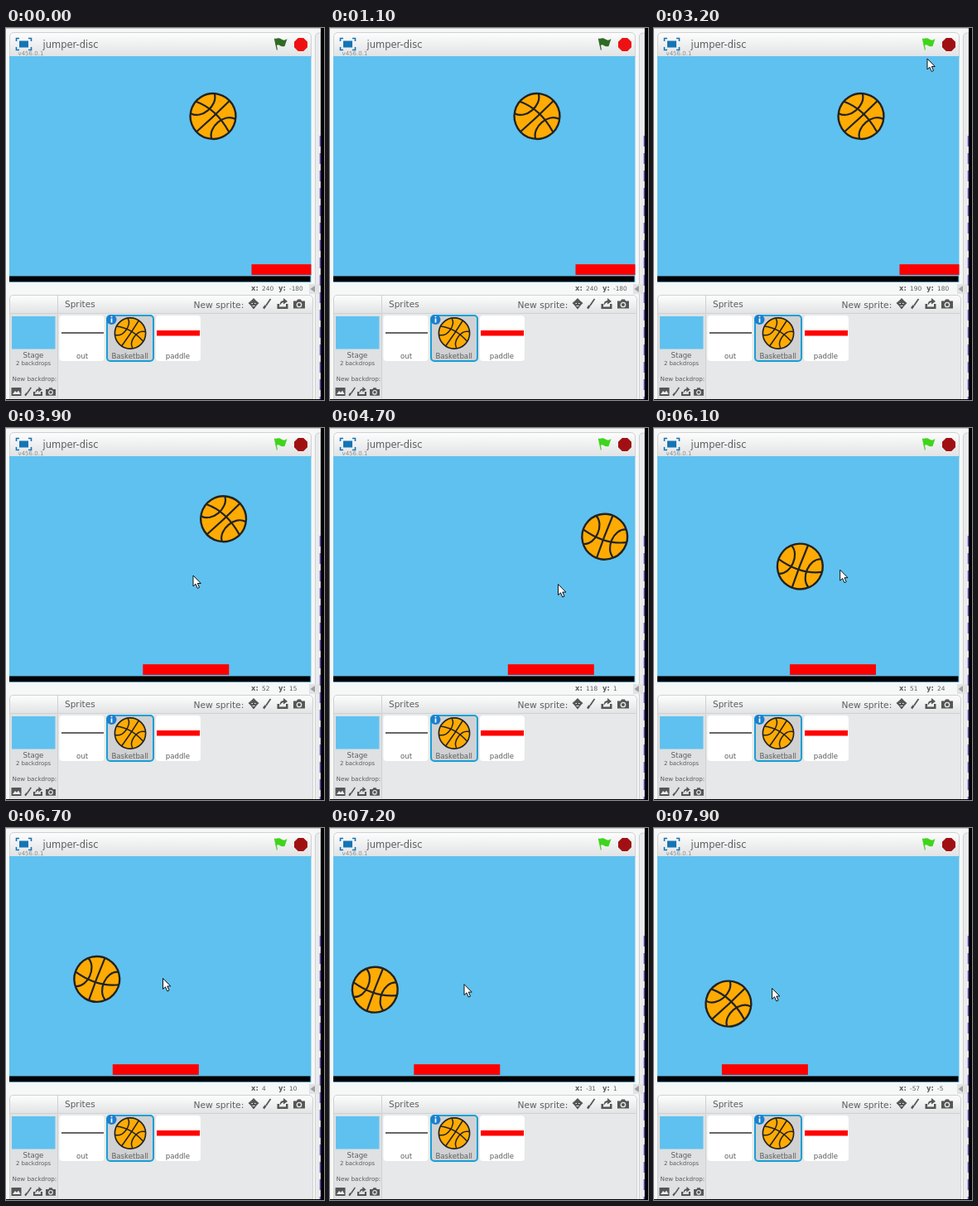
Write an HTML page that moves like this. It is 384 px wide and 449 px high and loops after 8000 ms.

```html
<!DOCTYPE html>
<html lang="en">
<head>
<meta charset="utf-8">
<title>Ball and paddle</title>
<style>
  html, body { margin: 0; width: 100%; height: 100%; overflow: hidden; background: #fff; }
  svg { display: block; width: 384px; height: 449px; font-family: "DejaVu Sans", sans-serif; }
  text { fill: #5c5d5f; }
  .mid { text-anchor: middle; font-size: 8.6px; }
  .num { font-size: 7.4px; }
  .key { font-size: 8.4px; font-weight: bold; }
  .edge { stroke: #cfd1d2; }
  .card { fill: #fff; }
  .seam { fill: none; stroke: #222; stroke-width: 2.2; }
</style>
</head>
<body>
<svg viewBox="0 0 384 449">
  <defs>
    <linearGradient id="bar" x2="0" y2="1">
      <stop offset="0" stop-color="#fdfdfd"/>
      <stop offset="1" stop-color="#e0e2e3"/>
    </linearGradient>
    <clipPath id="stage"><path d="M4 34H368.500V307H4z"/></clipPath>
    <g id="ball">
      <circle r="27.400" fill="#ffab03" stroke="#222" stroke-width="2.400"/>
      <g class="seam" transform="rotate(-54)">
        <path d="M-27 1Q0 1 27 -1M-4 -27Q9 -4 2 27"/>
        <path d="M-18 -20C-13 -6 13 -6 19 -19M-19 19C-13 6 13 6 18 20"/>
      </g>
    </g>
    <g id="brush" fill="none" stroke="#555">
      <path d="M4.500 -6L-1 2" stroke-width="1.800"/>
      <path d="M-1.500 2L-4 5.500" stroke-width="2.600"/>
    </g>
    <g id="upload" fill="#555">
      <path d="M-6.500 0H-4V3.500H4V0H6.500V6H-6.500z"/>
      <path d="M-3.500 2Q-3.500 -4 1 -4V-7L6 -3L1 .5V-2Q-1.500 -1.500 -3.500 2z"/>
    </g>
    <g id="camera">
      <path d="M-7 -3.500H-3L-2 -5.500H2L3 -3.500H7V5.500H-7z" fill="#555"/>
      <circle cy="1" r="2.700" fill="#555" stroke="#eee" stroke-width="1.300"/>
    </g>
  </defs>

  <rect width="384" height="449" fill="#fff"/>
  <path d="M0 0H380V449H0z" fill="#f6f7f7"/>
  <path d="M0 .5H380" stroke="#c9cbcc"/>
  <path class="edge" d="M380 6H378Q373.500 6 373.500 11V449H380z" fill="#e9ebec"/>
  <path d="M380 0H384V449H380z"/>
  <path d="M379.500 130V449" stroke="#6b4fc4" stroke-width="1.500" stroke-dasharray="13 8"/>

  <!-- stage header -->
  <path class="edge" d="M4.500 35V11Q4.500 5.500 10 5.500H363Q368.500 5.500 368.500 11V35z" fill="url(#bar)"/>
  <g fill="none" stroke="#1475b5" stroke-width="1.600">
    <path d="M12.500 16V12.500H16M27 12.500H30.500V16M30.500 23V26.500H27M16 26.500H12.500V23"/>
    <path d="M16 15.500H27V23.500H16z" fill="#1475b5" stroke="none"/>
  </g>
  <text x="44.500" y="24.300" font-size="11.500">jumper-disc</text>
  <text x="14.500" y="33" font-size="7" style="fill:#8c8e90">v456.0.1</text>
  <g id="flag">
    <path d="M325 13.500Q329 11 332.500 13.500T339.500 13L336.500 22Q333 23 330.500 21T326 22z"/>
    <path d="M323.800 13L325.300 12.300L328 26.500H326.800z"/>
  </g>
  <path id="stop" d="M352.800 12H359.200L364 16.800V23.200L359.200 28H352.800L348 23.200V16.800z"/>

  <!-- stage -->
  <g clip-path="url(#stage)">
    <path d="M4 34H369V307H4z" fill="#5fc1ef"/>
    <path d="M4 299.500H367.500V306.300H4z"/>
    <rect id="paddle" y="285.200" width="104" height="12.800" fill="#f00"/>
    <use id="mover" href="#ball"/>
  </g>

  <text class="key" x="296" y="317">x:</text>
  <text class="num" id="rx" x="309" y="317"></text>
  <text class="key" x="329" y="317">y:</text>
  <text class="num" id="ry" x="342" y="317"></text>
  <path d="M366 309H378V321H366z" fill="#e0e2e3"/>
  <path d="M373 311V319L367.500 315z" fill="#9b9d9f"/>

  <!-- sprite pane -->
  <path class="edge" d="M4.500 448V327Q4.500 322.500 9 322.500H365Q370.500 322.500 370.500 328V448z" fill="#e6e8e9"/>
  <path d="M5 345V327Q5 323 9 323H365Q370 323 370 328V345z" fill="url(#bar)"/>
  <path d="M5 345H62V448H5z" fill="#dfe1e2"/>
  <path class="edge" d="M5 344.500H370M62.500 323V448"/>
  <text x="71" y="337" font-size="10.500">Sprites</text>
  <text x="226.500" y="337.500" font-size="10.700">New sprite:</text>
  <g transform="translate(299 333)">
    <path d="M0 -7L3.500 -3.500L6.500 -1L4 1.500L0 6.500L-4 1.500L-6.500 -1L-3.500 -3.500z" fill="#555"/>
    <path d="M-2.500 -.5H-1M1 -.5H2.500M-1.500 2.500H1.500" stroke="#eee" stroke-width="1.200"/>
  </g>
  <use href="#brush" x="315" y="333"/>
  <use href="#upload" x="334" y="333"/>
  <use href="#camera" x="354" y="333"/>

  <path d="M7 348H59.500V387.500H7z" fill="#5fc1ef"/>
  <text class="mid" x="33" y="398">Stage</text>
  <text class="mid" x="33" y="407" style="font-size:6.900px">2 backdrops</text>
  <text x="7.500" y="425.500" font-size="7.200">New backdrop:</text>
  <path d="M6.500 434H18.500V444H6.500z" fill="#555"/>
  <path d="M8 442L11 438L13 440L15 437.500L17.500 442z" fill="#eee"/>
  <use href="#brush" transform="translate(26.500 439) scale(.85)"/>
  <use href="#upload" transform="translate(38.500 439) scale(.85)"/>
  <use href="#camera" transform="translate(54 439) scale(.85)"/>

  <rect class="card" x="64.500" y="347" width="54" height="55" rx="4"/>
  <path d="M67 368H118" stroke="#333" stroke-width="1.600"/>
  <text class="mid" x="92" y="399">out</text>
  <rect x="122" y="347" width="56" height="55" rx="4" fill="#d0d1d2" stroke="#179fd7" stroke-width="2"/>
  <use href="#ball" transform="translate(150 368.500) scale(.68)"/>
  <text class="mid" x="149.700" y="399">Basketball</text>
  <circle cx="127.500" cy="352" r="6" fill="#1b7fd0"/>
  <path d="M127.500 350.500V355.500M127.500 347.800V349.300" stroke="#fff" stroke-width="1.700"/>
  <rect class="card" x="181" y="347" width="54" height="55" rx="4"/>
  <path d="M182 365H234V371.500H182z" fill="#f00"/>
  <text class="mid" x="207.500" y="399">paddle</text>
  <path d="M0 448.500H384" stroke="#000"/>

  <path id="cursor" d="M0 0V13L3 10.300L5.300 15.500L7.500 14.500L5.300 9.500H9.300z" fill="#fff" stroke="#111"/>
</svg>
<script>
  const LOOP = 8000, STEP = 100, UNIT = 0.758;
  const CLICK = 3000, FOLLOW = 3300;
  const $ = id => document.getElementById(id);

  // [ms, x, y]
  const ballPath = [
    [3780, 250, 106.5], [4632, 339.3, 129.5], [7389, 33.3, 200], [8000, 101, 214.5]
  ];
  const mousePath = [
    [1500, 390, 330], [2450, 390, 130], [2550, 356, 48], [2900, 331, 20], [3100, 330, 30],
    [3200, 330, 37], [3300, 327, 51], [3600, 285, 120], [3900, 226, 178], [4200, 255, 190],
    [4450, 284, 192], [4700, 275.5, 188.6], [5100, 252, 183], [6100, 224.7, 171.2],
    [6600, 195, 180], [7200, 162, 188.6], [7800, 143.5, 193.5], [7900, 142.6, 193.5]
  ];

  function along(path, t) {
    if (t <= path[0][0]) return path[0].slice(1);
    const i = path.findIndex(p => p[0] > t);
    if (i < 0) return path[path.length - 1].slice(1);
    const [a, ax, ay] = path[i - 1], [b, bx, by] = path[i];
    const k = (t - a) / (b - a);
    return [ax + (bx - ax) * k, ay + (by - ay) * k];
  }

  const clamp = (v, lim) => Math.max(-lim, Math.min(lim, Math.trunc(v)));
  const place = (id, x, y, turn = 0) =>
    $(id).setAttribute("transform", `translate(${x} ${y}) rotate(${turn})`);

  function draw(t) {
    const [bx, by] = along(ballPath, t);
    const [mx, my] = along(mousePath, t);
    const leftward = t >= ballPath[1][0] && t < ballPath[2][0];
    const running = t >= CLICK;

    place("mover", bx, by, leftward ? 167 : 13);
    place("cursor", mx, my);
    $("cursor").style.display = t < 2500 ? "none" : "";
    $("paddle").setAttribute("x", t > FOLLOW ? Math.min(296.5, mx - 60.7) : 296.5);
    $("flag").setAttribute("fill", running ? "#3fd51d" : "#2f6a24");
    $("stop").setAttribute("fill", running ? "#a01012" : "#ee1013");
    $("rx").textContent = clamp((mx - 4) / UNIT - 240, 240);
    $("ry").textContent = clamp((189.5 - my) / UNIT, 180);
  }

  function tick() {
    const t = performance.now() % LOOP;
    draw(Math.floor(t / STEP) * STEP);
    requestAnimationFrame(tick);
  }
  tick();
</script>
</body>
</html>
```
